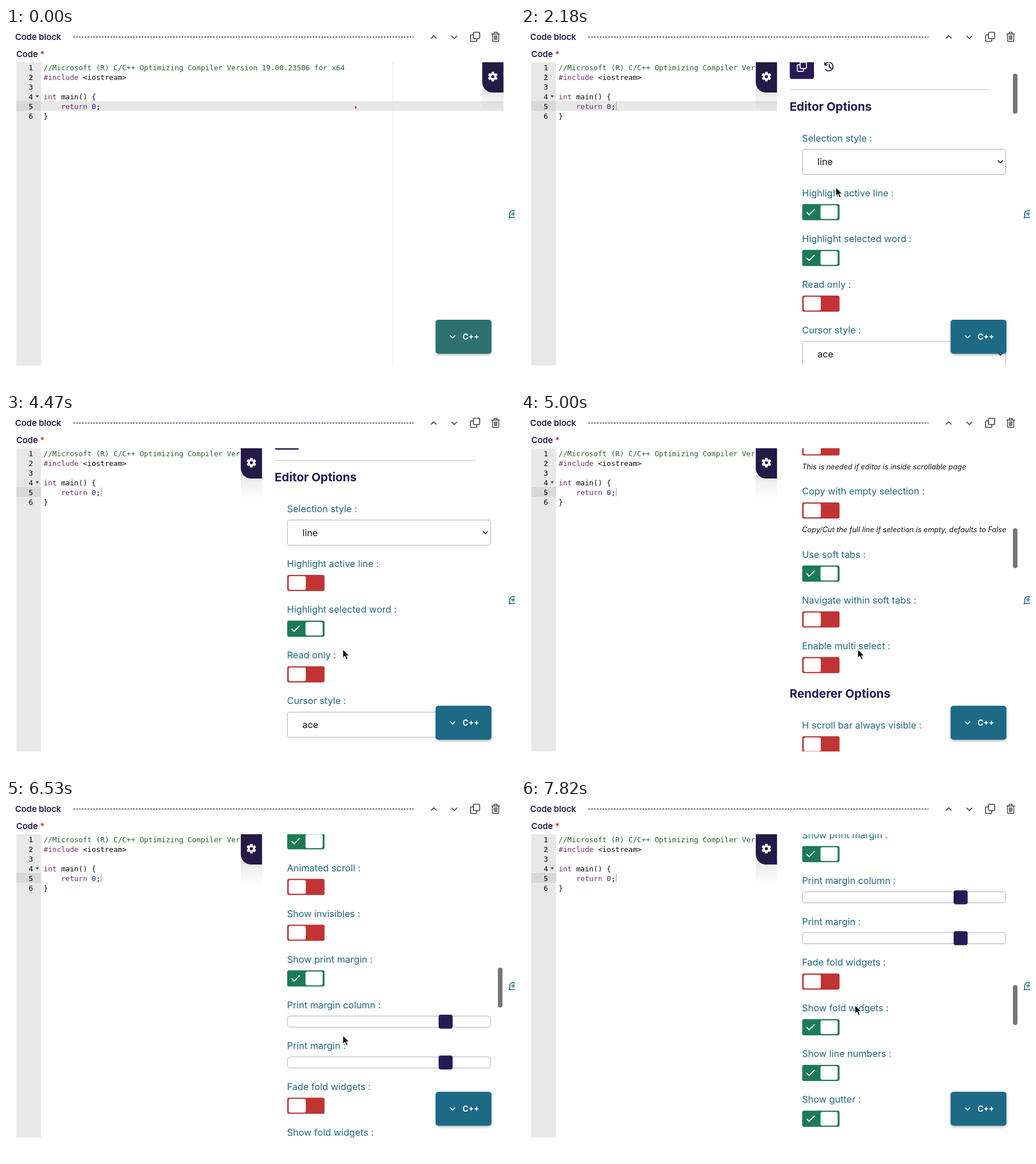
Animation of 893 by 627 pixels, one loop 8 s. Source, as an HTML page:

```html
<!DOCTYPE html>
<html lang="en">
<head>
<meta charset="utf-8">
<title>Code block settings</title>
<style>
  html, body { margin: 0; width: 100%; height: 100%; overflow: hidden; background: #fff; }
  svg { display: block; }
  text { font-family: Inter, sans-serif; white-space: pre; }
  .code text { font: 12.72px "DejaVu Sans Mono", monospace; fill: #0a0a0a; }
  .kw { fill: #772a6d; } .com { fill: #2b5f34; } .num { fill: #20207f; }
  .label { font-size: 16.4px; fill: #1f6780; }
  .head { font-size: 20.7px; font-weight: 700; fill: #241a52; }
  .note { font-size: 12.82px; font-style: italic; fill: #161616; }
  .value { font-size: 16.4px; fill: #161616; }
  .title { font-size: 14.8px; font-weight: 600; fill: #241a4a; }
  .field { fill: #fff; stroke: #bdbdbd; stroke-width: 1.2; }
  .line { fill: none; stroke-width: 1.6; stroke-linecap: round; stroke-linejoin: round; }
</style>
</head>
<body>
<svg width="893" height="627" viewBox="0 0 893 627">
  <defs>
    <clipPath id="editorClip"><rect id="editorBox" x="18" y="60" width="855" height="531"/></clipPath>
    <clipPath id="panelClip"><rect id="panelBox" y="60" height="531"/></clipPath>
    <linearGradient id="shade" x2="0" y2="1">
      <stop stop-opacity=".11"/><stop offset=".4" stop-opacity=".05"/><stop offset="1" stop-opacity="0"/>
    </linearGradient>
    <filter id="drop" x="-20%" y="-20%" width="140%" height="150%">
      <feDropShadow dx="0" dy="2" stdDeviation="2.2" flood-opacity=".3"/>
    </filter>
    <g id="copy" class="line">
      <rect x="-3" y="-8" width="11" height="11" rx="1.5"/>
      <path d="M-3-3.5H-6.5A1.5 1.5 0 0 0-8-2V6.5A1.5 1.5 0 0 0-6.5 8H1.5A1.5 1.5 0 0 0 3 6.5V3"/>
    </g>
  </defs>

  <text class="title" x="16" y="21">Code block</text>
  <path d="M118 15.7H715" stroke="#3a3060" stroke-width="1.5" stroke-dasharray="3 2"/>
  <g class="line" stroke="#3c3c44">
    <path d="M746 18l4.5-4.5 4.5 4.5M782 14l4.5 4.5 4.5-4.5"/>
    <use href="#copy" x="823" y="15.5"/>
    <path d="M852 10.5H866M856.5 10V7.5H861.5V10M853.5 11V22Q853.5 23.5 855 23.5H863Q864.5 23.5 864.5 22V11M856.8 13.5V20.5M859 13.5V20.5M861.2 13.5V20.5" stroke-width="1.4"/>
  </g>
  <text class="title" x="18" y="50.5">Code <tspan fill="#c03030">*</tspan></text>

  <g class="code" clip-path="url(#editorClip)">
    <path d="M18 60H61.5V591H18z" fill="#e8e8e8"/>
    <path d="M18 128H61.5V145H18z" fill="#d8d8d8"/>
    <path id="activeLine" d="M61.5 128H873V145H61.5z" fill="#e8e8e8"/>
    <path d="M679 60V591" stroke="#e2e2e2"/>
    <path d="M51.5 118h6.5l-3.25 4z" fill="#555"/>
    <g id="lines"></g>
    <circle id="dot" cx="613.5" cy="139" r="1.7" fill="#e0202c"/>
    <path id="caret" d="M167 129V144.5" stroke="#8a8a8a"/>
  </g>

  <g clip-path="url(#panelClip)">
    <g id="slide"><g id="content"></g></g>
    <rect id="thumb" x="863" width="8" height="70" rx="4" fill="#757575"/>
  </g>

  <g id="gear">
    <path d="M0 105H37.3V152H0z" fill="url(#shade)"/>
    <path d="M0 60H37.3V113H18A18 18 0 0 1 0 95z" fill="#241a47"/>
    <g id="cog" transform="translate(18.6 85.2)" fill="none" stroke="#fff">
      <circle r="4.6" stroke-width="3.7"/>
    </g>
  </g>

  <g filter="url(#drop)"><rect id="language" x="753.7" y="511" width="98" height="59.5" rx="5"/></g>
  <path class="line" d="M779.5 539l4 4 4-4" stroke="#fff"/>
  <text x="801" y="546" font-size="14" font-weight="700" fill="#fff">C++</text>

  <g class="line" stroke="#1f6b80">
    <path d="M882.5 332.5L884 328.5A6.3 6.3 0 1 1 887 331.6z"/>
    <path d="M886.5 325.5H893M889.7 322.3V328.7" stroke-width="1.4"/>
  </g>

  <g id="cursor">
    <path id="arrow" d="M0 0V15.5L3.6 12.2 6.2 18.2 8.9 17 6.3 11.2H11z" fill="#000" stroke="#fff" stroke-width="1.1"/>
    <path id="beam" class="line" d="M-3.5-8.5Q0-8.5 0-6Q0-8.5 3.5-8.5M0-6V6M-3.5 8.5Q0 8.5 0 6Q0 8.5 3.5 8.5M-2 3H2" stroke="#111"/>
    <path id="hand" d="M-1.5 1Q0-1.5 1.5 1V7Q3 5.5 4.5 7.2Q6 6 7.5 8Q9.5 7.5 9.5 10V14L7.5 19H-1.5L-6 12.5Q-6 9.5-3.5 11L-1.5 13z" fill="#fff" stroke="#000" stroke-width="1.1"/>
  </g>
</svg>
<script>
const $ = id => document.getElementById(id);
const set = (id, attrs) => { for (const k in attrs) $(id).setAttribute(k, attrs[k]); };
const text = (cls, x, y, s) => `<text class="${cls}" x="${x}" y="${y}">${s}</text>`;
const clamp = u => Math.min(1, Math.max(0, u));
const smooth = u => u * u * (3 - 2 * u);
const easeOut = u => 1 - (1 - u) ** 2;
const ramp = (t, a, b) => clamp((t - a) / (b - a));

// Keys are [time, value]; the value eases towards each key.
function track(keys, t, ease) {
  const i = keys.findIndex(k => k[0] > t);
  if (i < 0) return keys[keys.length - 1][1];
  if (!i) return keys[0][1];
  const [a, from] = keys[i - 1], [b, to] = keys[i];
  return from + (to - from) * ease(ramp(t, a, b));
}

const code = [
  '<tspan class="com">//Microsoft (R) C/C++ Optimizing Compiler Version 19.00.23506 for x64</tspan>',
  '<tspan class="kw">#include</tspan> &lt;iostream&gt;', '',
  '<tspan class="kw">int</tspan> main() {',
  '    <tspan class="kw">return</tspan> <tspan class="num">0</tspan>;', '}'];
$('lines').innerHTML = code.map((s, i) => {
  const y = 73.5 + i * 17;
  return `<text x="47.5" y="${y}" text-anchor="end">${i + 1}</text><text x="66" y="${y}">${s}</text>`;
}).join('');

for (let i = 0; i < 6; i++)
  $('cog').innerHTML += `<path d="M0-5.5V-8.4" stroke-width="4.4" transform="rotate(${i * 60})"/>`;

// Settings panel, laid out from top to bottom
const chevron = y => `<path class="line" d="M837 ${y - 2}l4 4 4-4" stroke="#222"/>`;
const widgets = {
  toggle: (y, on, id = '') => `<g transform="translate(493 ${y + 19})">
    <rect id="${id && id + 'Base'}" x=".5" y=".5" width="65.2" height="28" rx="3" fill="${on ? '#1a7b58' : '#c23333'}" stroke="#000" stroke-opacity=".16"/>
    <path id="${id && id + 'Tick'}" class="line" d="M8.5 15l4 4 9-9" stroke="${on ? '#fff' : 'none'}" style="stroke-width:2"/>
    <rect id="${id && id + 'Knob'}" x="${on ? 32.5 : 3}" y="2.5" width="30" height="24" rx="3" fill="#fff"/></g>`,
  select: (y, value) => `<rect class="field" x="493.6" y="${y + 19.5}" width="356.8" height="44" rx="4"/>`
    + text('value', 520, y + 47.5, value) + chevron(y + 41.5),
  slider: y => `<rect class="field" x="493.6" y="${y + 19.3}" width="356.8" height="19.5" rx="5"/>
    <rect x="759" y="${y + 16.8}" width="24.6" height="24.6" rx="4" fill="#261b55"/>`
};
const height = { toggle: 80.1, select: 96.2, slider: 71.5 };
const options = [
  ['Editor Options'],
  ['Selection style', 'select', 'line'],
  ['Highlight active line', 'toggle', 1, 'active'],
  ['Highlight selected word', 'toggle', 1],
  ['Read only', 'toggle', 0],
  ['Cursor style', 'select', 'ace'],
  ['Merge undo deltas', 'select', 'true'],
  ['Behaviours enabled', 'toggle', 1],
  ['Wrap behaviours enabled', 'toggle', 1],
  ['Auto scroll editor into view', 'toggle', 0, '', 'This is needed if editor is inside scrollable page'],
  ['Copy with empty selection', 'toggle', 0, '', 'Copy/Cut the full line if selection is empty, defaults to False'],
  ['Use soft tabs', 'toggle', 1],
  ['Navigate within soft tabs', 'toggle', 0],
  ['Enable multi select', 'toggle', 0],
  ['Renderer Options'],
  ['H scroll bar always visible', 'toggle', 0],
  ['V scroll bar always visible', 'toggle', 0],
  ['Highlight gutter line', 'toggle', 1],
  ['Animated scroll', 'toggle', 0],
  ['Show invisibles', 'toggle', 0],
  ['Show print margin', 'toggle', 1],
  ['Print margin column', 'slider'],
  ['Print margin', 'slider'],
  ['Fade fold widgets', 'toggle', 0],
  ['Show fold widgets', 'toggle', 1],
  ['Show line numbers', 'toggle', 1],
  ['Show gutter', 'toggle', 1]
];
let html = `<rect id="search" class="field" x="471.6" y="94.6" width="363.5" height="63.3" rx="4"/>
  <text x="488.5" y="132.5" style="font:20px 'DejaVu Sans Mono',monospace" fill="#555">Search...</text>
  <rect x="471.5" y="174.5" width="42.5" height="42.5" rx="4" fill="#261b55"/>
  <use href="#copy" x="492.7" y="195.6" stroke="#fff"/>
  <path class="line" d="M533.5 191.5A7.5 7.5 0 1 1 534.5 200.5M533 188V192.5H537.5M541 191.5V196L544 198.5" stroke="#261b55" style="stroke-width:1.9"/>
  <path d="M471.5 235.5H824" stroke="#bcbcbc"/>`;
let y = 265.3;
for (const [name, kind, value, id, note] of options) {
  if (!kind) {
    if (name !== 'Editor Options') y += 3.4;
    html += text('head', 471.3, y + 7.2, name);
    y += 55.3;
    continue;
  }
  html += text('label', 493, y + 5.8, name + ' :') + widgets[kind](y, value, id);
  if (note) html += text('note', 493, y + 71.6, note);
  y += height[kind] + (note ? 30.4 : 0);
}
$('content').innerHTML = html;

const scrollKeys = [[1700, 0], [1900, 48], [2180, 127.6], [2410, 154.4]];
const flickKeys = [[4650, 154.4], [5060, 1002.2], [6020, 1002.2], [6530, 1651.2], [7060, 1651.2], [7820, 1868.9]];
const cursorX = [[60, 893], [400, 847], [820, 847], [1060, 546], [1350, 552.5], [2800, 552.5], [3200, 540], [4000, 540], [4470, 591], [7060, 591], [7500, 586]];
const cursorY = [[60, 40], [400, 82], [820, 82], [1060, 155], [1350, 279], [2800, 279], [3200, 302], [4000, 302], [4470, 412], [7060, 412], [7500, 359]];
const OPEN = 420;

function thumbOpacity(t) {
  if (t < 1760) return 0;
  if (t < 4700) return 1 - ramp(t, 2660, 2890);
  if (t < 6030) return 1 - ramp(t, 5600, 5820);
  return 1;
}

function draw(t) {
  const edge = 872.8 - 423.6 * smooth(ramp(t, OPEN, 800));
  const scroll = t < 4650 ? track(scrollKeys, t, u => u) : track(flickKeys, t, easeOut);
  set('editorBox', { width: edge - 18 });
  set('panelBox', { x: edge, width: 873 - edge });
  set('gear', { transform: `translate(${edge - 37.3})` });
  set('slide', { transform: `translate(${edge - 449.2})` });
  set('content', { transform: `translate(0 ${-scroll})` });
  set('thumb', { y: 62 + scroll * 0.1402, opacity: thumbOpacity(t) });
  set('language', { fill: t < OPEN ? '#2e7070' : '#1c6b86' });
  set('dot', { opacity: +(t < 60) });
  set('caret', { opacity: +(t >= OPEN) });
  set('activeLine', { opacity: +(t < 3450) });

  const off = smooth(ramp(t, 3430, 3700));
  set('activeKnob', { x: 32.5 - 29.5 * off });
  set('activeBase', { fill: off < 0.5 ? '#1a7b58' : '#c23333' });
  set('activeTick', { opacity: 1 - off });

  const x = track(cursorX, t, smooth), cy = track(cursorY, t, smooth);
  const onSearch = t > 820 && t < 1700 && x > 471 && x < 835 && cy > 94 && cy < 158;
  const onGear = t > 300 && t < 830;
  const onToggle = t > 3000 && t < 4200 && x < 559 && cy > 282 && cy < 310;
  const shape = onSearch ? 'beam' : onGear || onToggle ? 'hand' : 'arrow';
  for (const id of ['arrow', 'beam', 'hand']) set(id, { visibility: id === shape ? 'inherit' : 'hidden' });
  set('cursor', { transform: `translate(${x} ${cy})`, visibility: t < 60 ? 'hidden' : 'visible' });
  $('search').style.stroke = onSearch ? '#7d7d7d' : '#bdbdbd';
}

function frame() {
  draw(performance.now() % 8000);
  requestAnimationFrame(frame);
}
frame();
</script>
</body>
</html>
```
